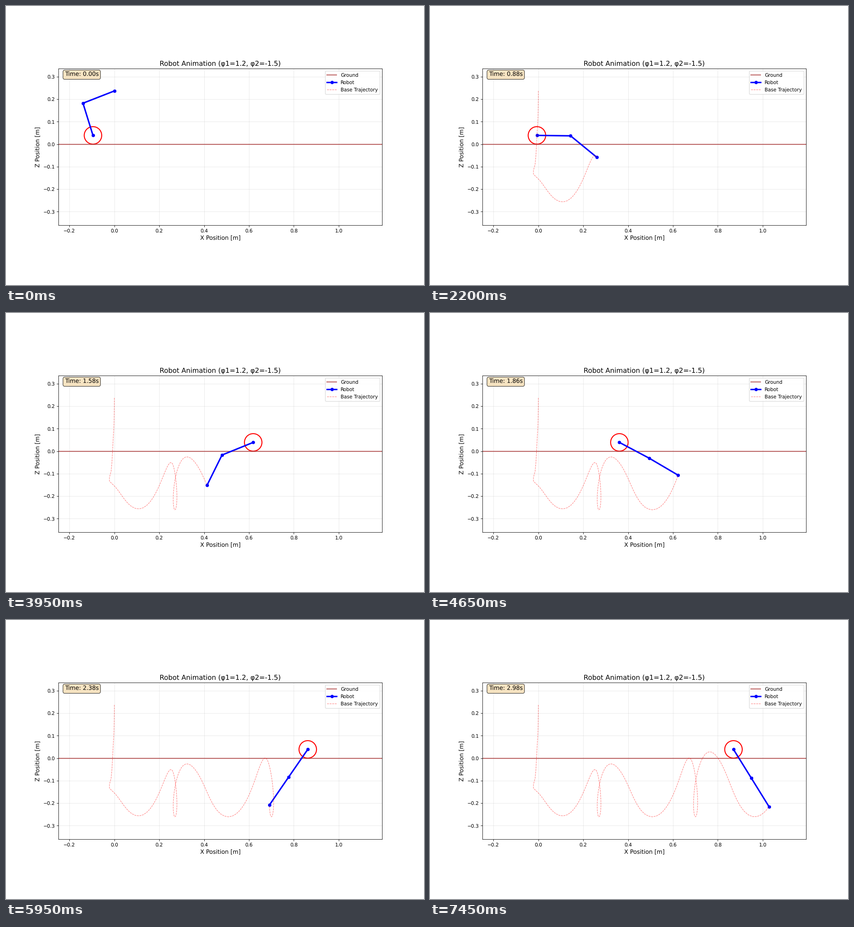
Animation, 917 px wide and 611 px high, one loop 7500 ms. Source, as a matplotlib script:

```python
import numpy as np
import matplotlib.pyplot as plt
from matplotlib.animation import FuncAnimation
from matplotlib.patches import Circle
from matplotlib.ticker import MultipleLocator

plt.rcParams["text.hinting"] = "none"

DPI = 76.375
FRAMES, DT = 150, 0.02
LINK, RADIUS = 0.15, 0.039
TURN = 2 * np.pi

# seconds -> half swings; whole numbers are passes through the lowest point
PHASE = [(0, -0.87), (0.1, -0.81), (0.2, -0.55), (0.3, -0.36), (0.44, -0.21),
         (0.55, 0), (1.12, 1), (1.7, 2), (2.3, 3), (2.91, 4), (3.53, 5)]
# seconds -> knee angle while the leg folds up and whips open
KNEE = [(0, 1.5), (0.1, 1.69), (0.2, 2.46), (0.24, 3.76), (0.3, 6.25),
        (0.44, 6.837), (0.7, TURN), (3, TURN)]


def ease(t, points):
    """Monotone cubic through the points, starting at rest."""
    x, y = np.array(points, float).T
    h = np.diff(x)
    rate = np.diff(y) / h
    a, b = rate[:-1], rate[1:]
    same = a * b > 0
    mid = np.where(same, 2 * a * b / np.where(same, a + b, 1), 0)
    m = np.concatenate([[0], mid, rate[-1:]])
    i = np.clip(np.searchsorted(x, t, side="right") - 1, 0, len(h) - 1)
    s = (t - x[i]) / h[i]
    return (y[i] + (y[i + 1] - y[i]) * s * s * (3 - 2 * s)
            + h[i] * s * (1 - s) * ((1 - s) * m[i] - s * m[i + 1]))


def link(angle):
    return LINK * np.array([np.sin(angle), np.cos(angle)])


def solve_motion():
    t = np.arange(FRAMES) * DT
    phase = ease(t, PHASE)

    # growing pendulum swing; the knee gives way after each peak
    lean = -(1.13 + 0.155 * t) * np.sin(np.pi * phase)
    k = np.maximum(phase, 0)
    lag = 0.87 * np.sin(np.pi * (k % 1) ** 2) ** 2 * np.sign(np.sin(np.pi * k))
    bend = ease(t, KNEE) + lag
    upper, lower = link(lean + bend / 2), link(lean - bend / 2)
    span = upper + lower

    # the base falls almost straight until the drifting swing takes over
    fall = -0.0217 * np.clip(t / 0.31, 0, 1) ** 4
    tau = t - 0.55
    drift = 0.088 + 0.34 * tau + 0.0106 * tau ** 2
    swing = drift + 0.0152 * np.cos(np.pi * phase) + 0.235 * span[0]
    base = np.array([np.maximum(fall, swing), RADIUS + span[1]])
    return base, base - upper, base - span


base, knee, wheel = solve_motion()

fig, ax = plt.subplots(figsize=(12.00655, 8), dpi=DPI)
ax.set_aspect("equal")
ax.set_xlim(-0.25, 1.194)
ax.set_ylim(-0.361, 0.3367)
ax.xaxis.set_major_locator(MultipleLocator(0.2))
ax.yaxis.set_major_locator(MultipleLocator(0.1))
ax.grid(True, alpha=0.3)
ax.set_xlabel("X Position [m]", fontsize=12)
ax.set_ylabel("Z Position [m]", fontsize=12)
ax.set_title("Robot Animation (φ1=1.2, φ2=-1.5)", fontsize=14)

ax.axhline(0, color="brown", lw=2, alpha=0.7, label="Ground")
robot, = ax.plot([], [], "bo-", lw=3, markersize=6, label="Robot")
trail, = ax.plot([], [], "r--", lw=1, alpha=0.5, label="Base Trajectory")
rim = ax.add_patch(Circle((0, RADIUS), RADIUS, fill=False, color="red", lw=2))
clock = ax.text(0.02, 0.95, "", transform=ax.transAxes, fontsize=12,
                bbox=dict(boxstyle="round", facecolor="wheat", alpha=0.8))
ax.legend(loc="upper right")


def draw(n):
    robot.set_data(*np.array([base[:, n], knee[:, n], wheel[:, n]]).T)
    trail.set_data(*base[:, :n + 1])
    rim.center = wheel[:, n]
    clock.set_text(f"Time: {n * DT:.2f}s")
    return robot, trail, rim, clock


anim = FuncAnimation(fig, draw, frames=FRAMES, interval=50,
                     repeat=True, repeat_delay=0)
plt.show()
```
